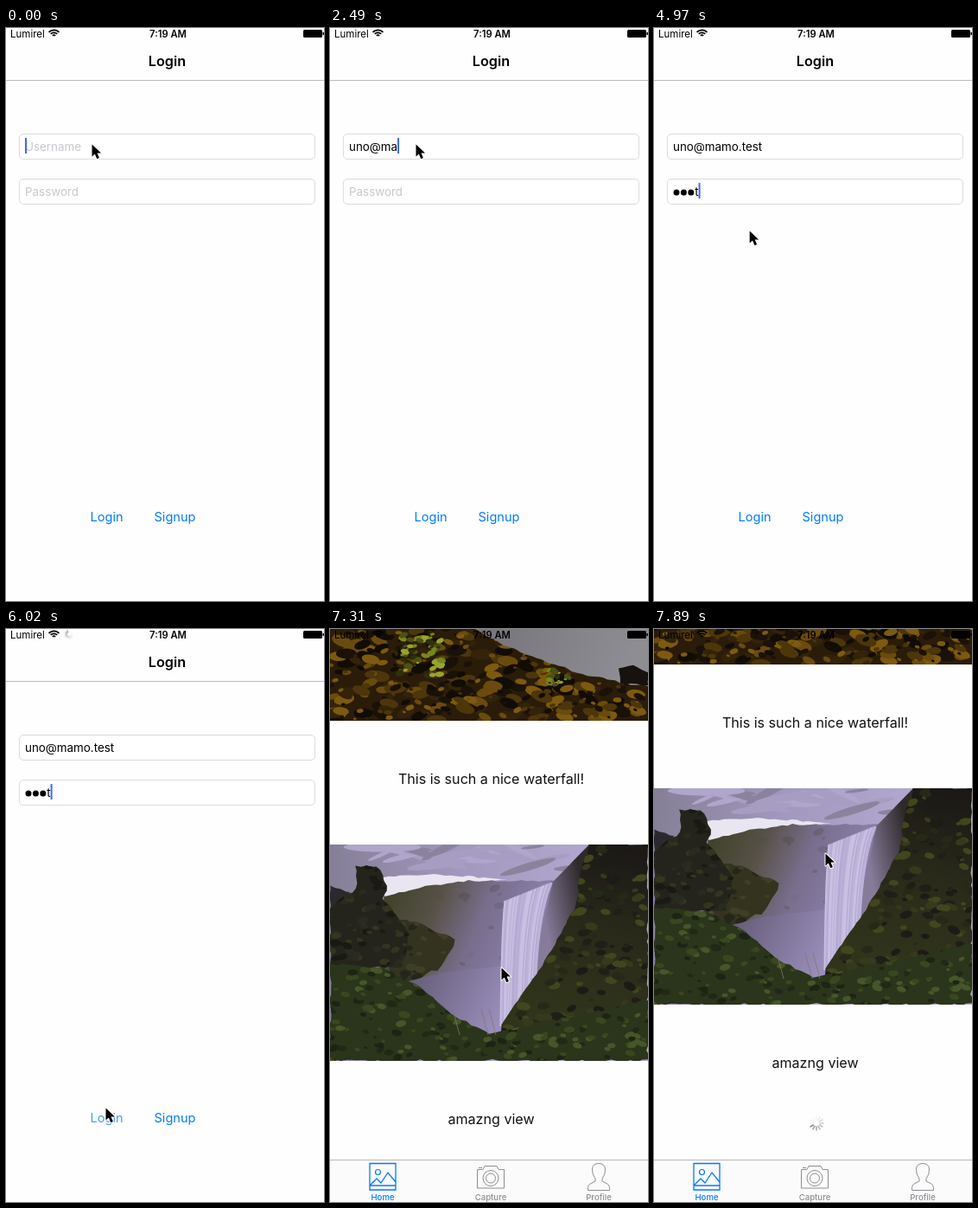
An HTML page with a canvas for the animation above (8000 ms loop, 368 by 662 pixels).

```html
<!DOCTYPE html>
<html lang="en">
<head>
<meta charset="utf-8">
<title>Login and feed</title>
<style>
  html, body { margin: 0; width: 100%; height: 100%; overflow: hidden; background: #fefefe; }
  canvas { display: block; width: 368px; height: 662px; }
</style>
</head>
<body>
<canvas id="stage"></canvas>
<script>
const W = 368, H = 662, LOOP = 8000;
const BLUE = '#007aff', GREY = '#8e8e93', WHITE = '#fefefe';
const EMAIL = 'uno@mamo.test', SECRET = 'test';
const ratio = window.devicePixelRatio || 1;

function setup(canvas, h) {
  canvas.width = W * ratio;
  canvas.height = h * ratio;
  const ctx = canvas.getContext('2d');
  ctx.scale(ratio, ratio);
  return ctx;
}

const main = setup(document.getElementById('stage'), H);
let c = main;

const clamp = u => Math.min(1, Math.max(0, u));
const mix = (a, b, u) => a + (b - a) * u;

let seed = 7;
function rand(a = 0, b = 1) {
  seed = (seed * 16807) % 2147483647;
  return mix(a, b, seed / 2147483647);
}

// ---- drawing helpers ----

function text(str, x, y, size, color = '#000', weight = 400, align = 'left') {
  c.font = `${weight} ${size}px Inter, "Open Sans", sans-serif`;
  c.textAlign = align;
  c.fillStyle = color;
  c.fillText(str, x, y);
  return c.measureText(str).width;
}

function rect(x, y, w, h, color) {
  c.fillStyle = color;
  c.fillRect(x, y, w, h);
}

function disc(x, y, rx, ry, color, turn = 0) {
  c.beginPath();
  c.ellipse(x, y, rx, ry, turn, 0, 7);
  c.fillStyle = color;
  c.fill();
}

function line(d, color, width = 1) {
  c.strokeStyle = color;
  c.lineWidth = width;
  c.stroke(new Path2D(d));
}

function ring(x, y, r, color, width = 1) {
  c.beginPath();
  c.arc(x, y, r, 0, 7);
  c.strokeStyle = color;
  c.lineWidth = width;
  c.stroke();
}

function fade(x0, y0, x1, y1, ...colors) {
  const g = c.createLinearGradient(x0, y0, x1, y1);
  colors.forEach((col, i) => g.addColorStop(i / (colors.length - 1), col));
  return g;
}

function spinner(x, y, inner, outer, head, width) {
  c.save();
  c.translate(x, y);
  c.lineCap = 'round';
  for (let i = 0; i < 12; i++) {
    const age = (head - i + 120) % 12;
    c.globalAlpha = Math.max(0.06, 0.85 - age * 0.1);
    line(`M0 ${-inner}V${-outer}`, '#777', width);
    c.rotate(Math.PI / 6);
  }
  c.restore();
}

// ---- pictures ----

function scatter(n, x, y, w, h, size, colors, flat = 0.6) {
  for (let i = 0; i < n; i++) {
    const r = size * rand(0.3, 1);
    disc(x + rand(0, w), y + rand(0, h), r, r * flat, colors[i % colors.length], rand(-0.5, 0.5));
  }
}

// a polygon with ragged edges, filled and mottled
function land(points, fill, jag = 0, n = 0, size = 5, colors = []) {
  const pts = points.split(' ').map(p => p.split(',').map(Number));
  const path = new Path2D();
  pts.forEach(([x, y], i) => {
    const [x1, y1] = pts[(i + 1) % pts.length];
    const parts = Math.ceil(Math.hypot(x1 - x, y1 - y) / 7);
    for (let j = 0; j < parts; j++) {
      const u = j / parts;
      path.lineTo(mix(x, x1, u) + rand(-jag, jag), mix(y, y1, u) + rand(-jag, jag));
    }
  });
  c.save();
  c.fillStyle = fill;
  c.fill(path);
  c.clip(path);
  const xs = pts.map(p => p[0]), ys = pts.map(p => p[1]);
  const left = Math.min(...xs), top = Math.min(...ys);
  scatter(n, left, top, Math.max(...xs) - left, Math.max(...ys) - top, size, colors);
  c.restore();
}

function picture(h, paint) {
  const sheet = document.createElement('canvas');
  c = setup(sheet, h);
  paint();
  c = main;
  return sheet;
}

function paintShore() {
  const moss = ['#120c06', '#4d360a', '#1a1108', '#6b4b0d', '#33230a', '#7d5a10'];
  rect(0, 0, W, 106, '#2a1c09');
  scatter(260, 0, 0, W, 106, 13, moss, 0.5);
  scatter(160, 0, 0, W, 106, 5, moss);
  land('150,-9 375,-9 375,66 335,62 285,50 240,34 190,13', fade(180, 0, 340, 60, '#77757b', '#8f8d94'), 1.5);
  land('334,46 350,41 368,50 368,66 336,62', '#17120d', 1);
  const bush = ['#4a5213', '#77861e', '#2c300c', '#98a42c'];
  scatter(60, 80, 5, 52, 50, 6, bush);
  scatter(20, 250, 46, 26, 20, 5, bush);
}

function paintValley() {
  rect(0, 0, W, 250, fade(0, 0, 300, 30, '#857e96', '#a298bd', '#b2a8cf'));
  scatter(24, 0, 0, 300, 28, 45, ['#8b839e', '#a79dc2', '#b0a6cb'], 0.13);
  land('55,38 120,34 205,40 150,46 64,62', '#e9e6f2', 1);
  // far hill fading into mist
  land('62,60 110,48 160,42 262,42 250,230 120,230 60,150',
    fade(70, 60, 215, 120, '#42432d', '#575147', '#786d8b', '#877da6'), 1,
    60, 7, ['#4b484333', '#6b617733', '#38381f33']);
  land('80,160 130,148 200,140 215,230 110,230', fade(95, 150, 200, 200, '#665d78', '#9a8fbc'));
  land('50,90 95,88 145,110 130,142 75,165', '#33331f', 2, 40, 7, ['#25261a', '#3f3f25']);
  land('258,43 300,0 300,90 225,190', fade(245, 70, 295, 60, '#877b9a', '#2e292b'));
  for (let i = 0; i < 28; i++) {
    const u = i / 27, x = mix(203, 256, u), y = mix(65, 44, u);
    const end = mix(198, 238, u), low = mix(210, 150, u);
    line(`M${x} ${y}Q${mix(x, end, 0.8)} ${y + 35} ${end} ${low}`,
      ['#bdb3da', '#c9c0e2', '#b5abd2'][Math.floor(rand(0, 3))], 3);
  }
  // dark slopes
  land('0,47 24,56 0,76', '#2b292d', 1);
  land('0,142 0,74 30,50 30,24 54,25 66,47 62,62 92,103 82,142', '#24241c', 1.5,
    90, 7, ['#191a14', '#35351f', '#2a2b20']);
  land('300,0 368,0 368,230 198,225 198,208 226,168 246,140 283,74 290,35',
    fade(330, 0, 280, 200, '#1b1816', '#2a2a1a', '#30341b'), 1.5,
    240, 8, ['#201f17', '#363a1c', '#272918', '#42461f', '#1d1b15']);
  land('0,138 60,142 100,162 125,182 150,203 185,219 250,205 368,180 368,250 0,250',
    '#2b351b', 2, 320, 7, ['#202816', '#38471f', '#2a351a', '#46562b', '#1d2414']);
  for (const x of [142, 175, 184]) line(`M${x + 8} 220L${x} 190`, '#8a7563', 0.8);
}

const shore = picture(106, paintShore);
const valley = picture(250, paintValley);

// ---- screens ----

function feed(k, shift) {
  rect(0, 0, W, H, WHITE);
  c.save();
  c.translate(0, -shift);
  c.drawImage(shore, 0, 0, W, 106);
  text('This is such a nice waterfall!', 186.5, 179, 16.1, '#111', 400, 'center');
  c.drawImage(valley, 0, 249, W, 250);
  text('amazng view', 186.5, 572, 16.1, '#111', 400, 'center');
  spinner(188, 636, 4, 8, Math.floor(k * 1.4) - 1, 1.5);
  c.restore();
  tabs();
}

function tabs() {
  rect(0, 613, W, 49, '#fbfbfb');
  rect(0, 613, W, 1, '#b8b8b8');
  // picture
  line('M46 617.5H76V648H46ZM46 643L54 635 59 640 67 628 76 639M46 643H76', BLUE, 1.3);
  ring(55.5, 627.5, 3, BLUE, 1.2);
  // camera
  line('M170.5 624.5H177L179 620.5H193L195 624.5H201.5V646H170.5ZM172 622.5H176', GREY);
  for (const r of [9, 5.5]) ring(186, 634.5, r, GREY);
  // person
  line('M298.5 648.5Q298 642 302 640.5L307 638V635Q303 630 303.5 624Q304 617.5 311 617.5' +
    'T318.5 624Q319 630 315 635V638L320 640.5Q324 642 323.5 648.5Z', GREY);
  ['Home', 'Capture', 'Profile'].forEach((name, i) =>
    text(name, 61 + i * 125, 659.5, 9.6, i ? GREY : BLUE, 500, 'center'));
}

function field(y, hint, draw, focus, alpha) {
  c.beginPath();
  c.roundRect(15.5, y + 0.5, 342, 29, 4.5);
  c.fillStyle = '#fff';
  c.fill();
  c.strokeStyle = '#dcdcdc';
  c.lineWidth = 1;
  c.stroke();
  const width = draw ? draw() : 0;
  if (!draw) text(hint, 22, y + 19.5, 13.4, '#c7c7cd');
  if (focus) {
    c.globalAlpha = alpha;
    rect(22 + width, y + 5, 2, 18, '#4169ed');
    c.globalAlpha = 1;
  }
}

const typed = (k, first, rate) => Math.max(0, Math.floor(1 + (k - first) * rate));

function emailAt(k) {
  if (k >= 4 && k < 11) return k < 9 ? EMAIL[0].toUpperCase() : EMAIL[0];
  return k < 30 ? EMAIL.slice(0, typed(k, 13, 0.7)) : EMAIL;
}

function secret(count) {
  const step = 8.4, dots = (count - 1) * step;
  for (let x = 0; x < dots; x += step) disc(26 + x, 190, 3.5, 3.5, '#000');
  return dots + text(SECRET[count - 1], 22 + dots, 193.5, 13.4);
}

function login(k) {
  rect(0, 0, W, H, WHITE);
  rect(0, 60, W, 1, '#bcbcbc');
  text('Login', 186.5, 44, 16.2, '#000', 600, 'center');
  const mail = emailAt(k), count = Math.min(SECRET.length, typed(k, 35, 0.67));
  const caret = k < 4 ? clamp(1 - k / 2) : 1;
  field(122, 'Username', mail && (() => text(mail, 22, 141.5, 13.4)), k < 30, caret);
  field(174, 'Password', count && (() => secret(count)), k >= 30, 1);
  c.globalAlpha = k < 50 ? 1 : clamp(0.3 + (k - 50) * 0.45);
  text('Login', 97.5, 569.5, 14.6, BLUE);
  c.globalAlpha = 1;
  text('Signup', 171.5, 569.5, 14.6, BLUE);
}

function status(k) {
  text('Lumirel', 5, 10.5, 11.5);
  text('7:19 AM', 187.5, 10.5, 11.2, '#000', 600, 'center');
  for (const r of [8.2, 5.2, 2.2]) {
    c.beginPath();
    c.arc(55.5, 10.5, r, -Math.PI * 0.76, -Math.PI * 0.24);
    c.strokeStyle = '#000';
    c.lineWidth = 1.7;
    c.stroke();
  }
  c.beginPath();
  c.roundRect(344, 2, 22, 9, 1.5);
  c.fillStyle = '#000';
  c.fill();
  rect(366.5, 5, 1.5, 3, '#000');
  if (k >= 50 && k < 53) spinner(73, 6, 2.5, 4.8, Math.floor(k * 1.4), 1);
}

// ---- motion ----

// pointer stops: tick, x, y
const STOPS = [[41, 99, 134], [46, 155, 634], [48, 115, 553], [51, 115, 553], [53, 252, 348], [60, 198, 391]];
const dragAt = k => 132 * clamp((k - 62) / 5) ** 2;

function pointerAt(k) {
  const i = Math.max(1, STOPS.findIndex(s => s[0] > k));
  const [[k0, x0, y0], [k1, x1, y1]] = k < 60 ? [STOPS[i - 1], STOPS[i]] : STOPS.slice(-2);
  const u = clamp((k - k0) / (k1 - k0));
  return [mix(x0, x1, u), mix(y0, y1, u) - dragAt(k)];
}

function pointer(x, y) {
  c.save();
  c.translate(x, y);
  const arrow = 'M.5.5V14.5L3.8 11.5 6.3 17.2 8.9 16 6.5 10.5H11Z';
  c.lineJoin = 'round';
  line(arrow, '#fff', 2);
  c.fillStyle = '#000';
  c.fill(new Path2D(arrow));
  c.restore();
}

// the screen refreshes about every 118 ms, slightly faster once the form is sent
function tickAt(t) {
  return t < 5668 ? Math.floor((t + 12) / 118.3) : 48 + Math.floor((t - 5668) / 116.4);
}

function draw(k) {
  const slide = H * (1 - (1 - clamp((k - 51) / 3.91)) ** 3);
  if (slide > 0) feed(k, Math.round(dragAt(k) * 0.49));
  if (slide < H) {
    c.save();
    c.translate(0, Math.round(slide));
    login(k);
    c.restore();
  }
  status(k);
  pointer(...pointerAt(k));
}

const start = performance.now();
function frame(now) {
  draw(tickAt(Math.max(0, now - start) % LOOP));
  requestAnimationFrame(frame);
}
draw(0);
requestAnimationFrame(frame);
</script>
</body>
</html>
```
